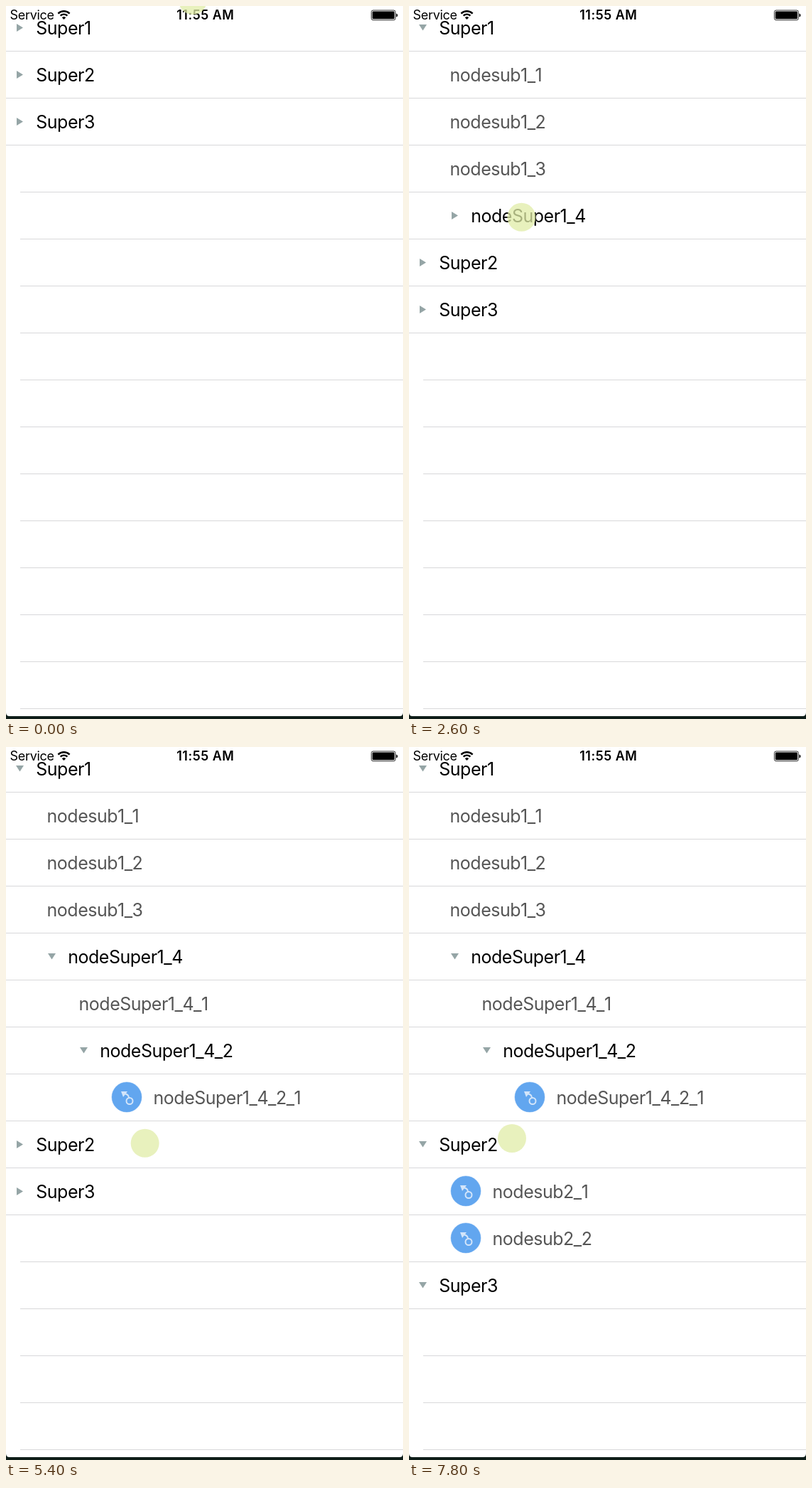
An HTML page for the animation above (8 s loop, 559x1002 px).

```html
<!DOCTYPE html>
<html lang="en">
<head>
<meta charset="utf-8">
<title>Tree list</title>
<style>
  html, body { margin: 0; width: 100%; height: 100%; overflow: hidden; background: #fff; }
  svg { display: block; width: 559px; height: 1002px; }
  text { font-family: Inter, Roboto, sans-serif; }
  .label { font-size: 25px; letter-spacing: -0.5px; font-kerning: none; }
  .leaf { fill: #555; }
  .mark { fill: #95a5a6; }
  .status { font-size: 18px; letter-spacing: -0.3px; }
  .clock { font-weight: 600; letter-spacing: 0.5px; text-anchor: middle; }
</style>
</head>
<body>
<svg viewBox="0 0 559 1002">
  <defs>
    <g id="badge">
      <circle r="21" fill="#62a6ef" stroke="#62a6ef" stroke-opacity=".5"/>
      <g fill="none" stroke="#d3e5fa" stroke-width="2">
        <circle cx="4" cy="5.5" r="4.5"/>
        <path d="M3 1Q3 -4 -4 -5"/>
      </g>
      <path d="M-8 -8L1 -8L-5 0Z" fill="#d3e5fa"/>
    </g>
  </defs>
  <rect width="559" height="1002" fill="#0e1d18"/>
  <path d="M0 0H559V993Q559 998 554 998H5Q0 998 0 993Z" fill="#fff"/>
  <g id="list"></g>
  <g id="bar">
    <text class="status" x="5.5" y="19">Service</text>
    <g fill="none" stroke="#000" stroke-width="2.3">
      <path d="M73.4 10.6A11.5 11.5 0 0 1 89.6 10.6"/>
      <path d="M76.6 13.6A7 7 0 0 1 86.4 13.6"/>
    </g>
    <path d="M81.5 19L78.8 16.2A3.9 3.9 0 0 1 84.2 16.2Z"/>
    <text class="status clock" x="280.8" y="19">11:55 AM</text>
    <rect x="514.4" y="6" width="34" height="13.8" rx="2.5" fill="none" stroke="#000" stroke-width=".8"/>
    <rect x="515.8" y="7.5" width="31.2" height="10.8" rx="1.2"/>
    <path d="M549.5 10.5Q551.5 11 551.5 13T549.5 15.5Z"/>
  </g>
  <circle id="pointer" r="20" fill="rgb(224,236,167)" fill-opacity=".75"/>
</svg>
<script>
const LOOP = 8000, STEP = 200, ROW = 66, TOP = -2;
const GROW = 300, FADE = 500, PRESS = 100;
const LINE = '#d8d8da', EDGE = '#bababc';

// Moments at which the branches are tapped
const tap = { one: 1255, four: 2750, deep: 4450, two: 5731, three: 7250 };

const row = (label, depth, born, open, icon) => ({ label, depth, born, open, icon });
const rows = [
  row('Super1', 0, -LOOP, tap.one),
  row('nodesub1_1', 1, tap.one),
  row('nodesub1_2', 1, tap.one),
  row('nodesub1_3', 1, tap.one),
  row('nodeSuper1_4', 1, tap.one, tap.four),
  row('nodeSuper1_4_1', 2, tap.four),
  row('nodeSuper1_4_2', 2, tap.four, tap.deep),
  row('nodeSuper1_4_2_1', 3, tap.deep, 0, true),
  row('Super2', 0, -LOOP, tap.two),
  row('nodesub2_1', 1, tap.two, 0, true),
  row('nodesub2_2', 1, tap.two, 0, true),
  row('Super3', 0, -LOOP, tap.three)
];

// Pointer stops: time, x, y
const path = [
  [0, 263, -8], [1100, 140, 38], [1300, 145, 45], [1600, 162, 153],
  [2500, 158, 296], [2850, 160, 300], [3400, 172, 398], [4000, 176, 424],
  [4450, 178, 430], [4600, 185, 530], [5000, 192, 552], [5700, 198, 560],
  [6000, 208, 636], [6700, 168, 752], [7000, 164, 757], [7250, 160, 757],
  [7800, 145, 550]
];

const list = document.getElementById('list');
const pointer = document.getElementById('pointer');

const ease = x => {
  x = Math.min(1, Math.max(0, x));
  return x * x * (3 - 2 * x);
};

const line = (y, color = LINE, x = 0) =>
  `<rect x="${x}" y="${y}" width="${559 - x}" height="1" fill="${color}"/>`;

function shade(open, t) {
  if (!open || t < open - PRESS) return 255;
  return Math.round(217 + 38 * ease((t - open) / FADE));
}

function body(r, y, t) {
  const x = 45 * r.depth, g = shade(r.open, t), mid = y + 32;
  let art = '', textX = x + 12.6;
  if (r.open) {
    textX = x + 42.3;
    const shape = t >= r.open ? 'l11 0l-5.5 8.5z' : 'l9 5.5l-9 5.5z';
    const start = t >= r.open ? [x + 14, mid - 4] : [x + 15, mid - 5];
    art = `<path class="mark" d="M${start}${shape}"/>`;
  } else if (r.icon) {
    textX = x + 72.6;
    art = `<use href="#badge" x="${x + 35}" y="${mid}"/>`;
  }
  return `<rect y="${y}" width="559" height="${ROW}" fill="rgb(${g},${g},${g})"/>${art}` +
    `<text class="label${r.open ? '' : ' leaf'}" x="${textX}" y="${y + 42}">${r.label}</text>`;
}

function drawList(t) {
  const shown = rows.filter(r => t >= r.born);
  let y = TOP, out = '', pending = '', shifting = false;
  for (const r of shown) {
    const grown = ease((t - r.born) / GROW), top = Math.round(y);
    const under = line(top + ROW - 1);
    const edge = shifting ? line(top - 1, EDGE) : '';
    if (grown < 1) {
      // separators of entering rows lie above their siblings
      out += body(r, top, t) + edge;
      pending += under;
      shifting = true;
    } else {
      out += pending + body(r, top, t) + under + edge;
      pending = '';
    }
    y += ROW * grown;
  }
  for (let b = 63 + ROW * shown.length; b < 998; b += ROW) out += line(b, LINE, 20);
  list.innerHTML = out + pending;
}

function movePointer(t) {
  const i = Math.max(1, path.findIndex(p => p[0] >= t));
  const [t0, x0, y0] = path[i - 1], [t1, x1, y1] = path[i];
  const k = ease((t - t0) / (t1 - t0));
  pointer.setAttribute('cx', x0 + (x1 - x0) * k);
  pointer.setAttribute('cy', y0 + (y1 - y0) * k);
}

let last = -1;
function tick() {
  const t = Math.floor((performance.now() % LOOP) / STEP) * STEP;
  if (t !== last) {
    last = t;
    drawList(t);
    movePointer(t);
  }
  requestAnimationFrame(tick);
}
tick();
</script>
</body>
</html>
```
